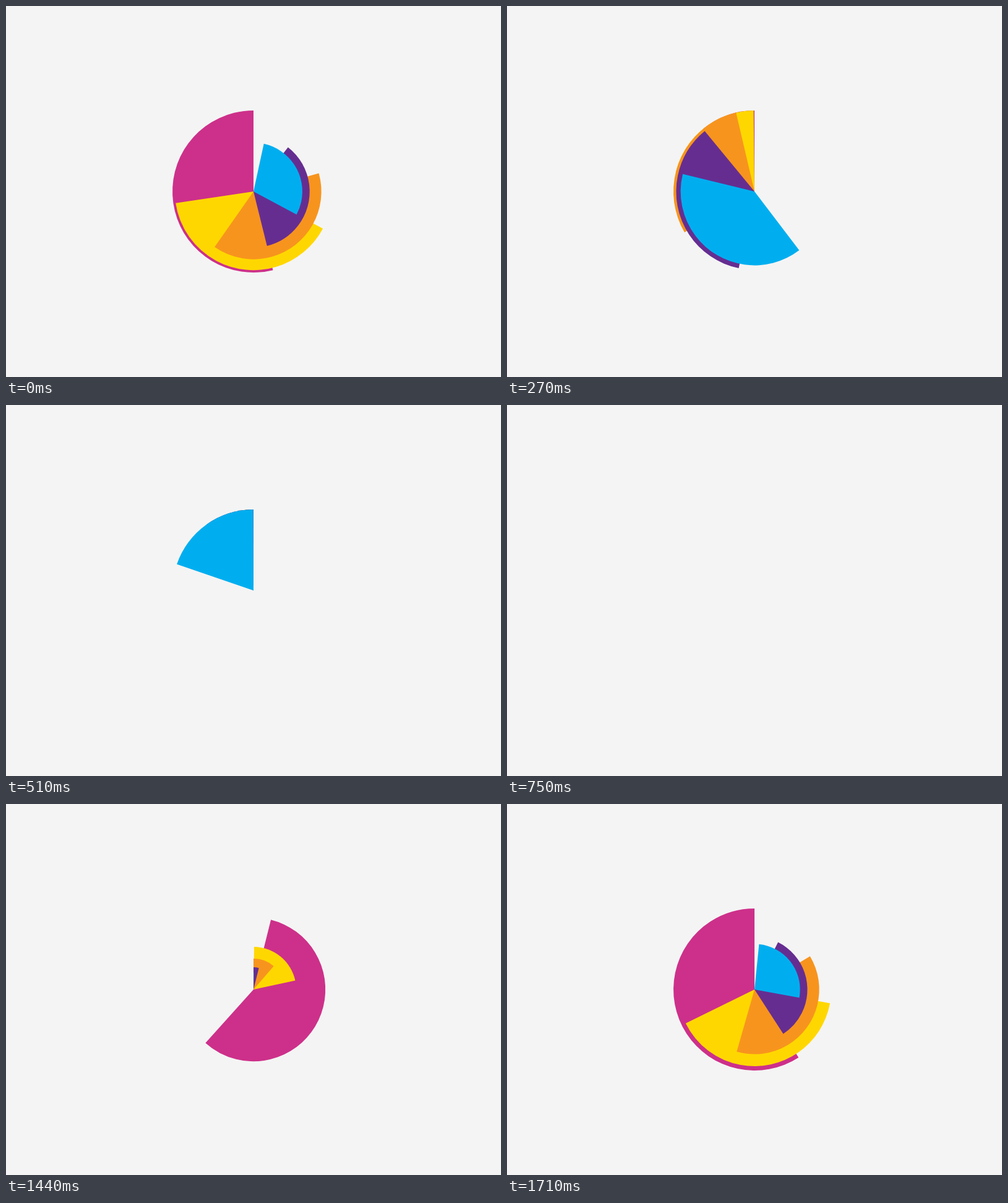
An HTML page with a canvas that plays this animation: 800 by 600 pixels, repeating every 1740 ms.

```html
<!DOCTYPE html>
<html lang="en">
<head>
<meta charset="utf-8">
<title>Pie swirl</title>
<style>
  html, body { margin: 0; width: 100%; height: 100%; overflow: hidden; background: #f4f4f4; }
  canvas { display: block; }
</style>
</head>
<body>
<canvas id="stage" width="800" height="600"></canvas>
<script>
const LOOP = 1740, STEP = 30;
const CX = 400, CY = 300, RADIUS = 131;
const SWEEP = 843.7;   // ms for an edge to go all the way round
const LAG = 76.7;      // ms between neighbouring slices
const LEAD = 1109.8;   // the first leading edge sets off
const TRAIL = 1339.9;  // the first trailing edge sets off

// Bottom to top: colour, start and length of growth, length of the leading sweep
const slices = [
  { color: '#cd308a', grow: [990, 569], sweep: 571 },
  { color: '#ffd700', grow: [1031, 790], sweep: SWEEP },
  { color: '#f7941e', grow: [1051, 926], sweep: SWEEP },
  { color: '#662d91', grow: [1080, 1045], sweep: SWEEP },
  { color: '#00aeef', grow: [1120, 1090], sweep: SWEEP }
];

const ctx = document.getElementById('stage').getContext('2d');

function ease(time, start, length) {
  const x = Math.min(1, Math.max(0, (time - start) / length));
  return x * x * (3 - 2 * x);
}

function sector(color, r, from, to) {
  if (to - from < 1e-5 || r <= 0) return;
  const angle = turn => turn * 2 * Math.PI - Math.PI / 2;
  ctx.fillStyle = color;
  ctx.beginPath();
  ctx.moveTo(CX, CY);
  ctx.arc(CX, CY, r, angle(from), angle(to));
  ctx.closePath();
  ctx.fill();
}

function draw(ms) {
  const t = Math.floor((ms % LOOP) / STEP) * STEP;
  // The swirl runs past the loop point, so early times belong to its tail
  const time = t < 900 ? t + LOOP : t;
  ctx.fillStyle = '#f4f4f4';
  ctx.fillRect(0, 0, 800, 600);
  slices.forEach((s, i) => {
    const r = RADIUS * ease(time, ...s.grow);
    const from = ease(time, TRAIL + i * LAG, SWEEP);
    const to = ease(time, LEAD + i * LAG, s.sweep);
    sector(s.color, r, from, to);
  });
}

const begin = performance.now();
function tick() {
  draw(performance.now() - begin);
  requestAnimationFrame(tick);
}
tick();
</script>
</body>
</html>
```
